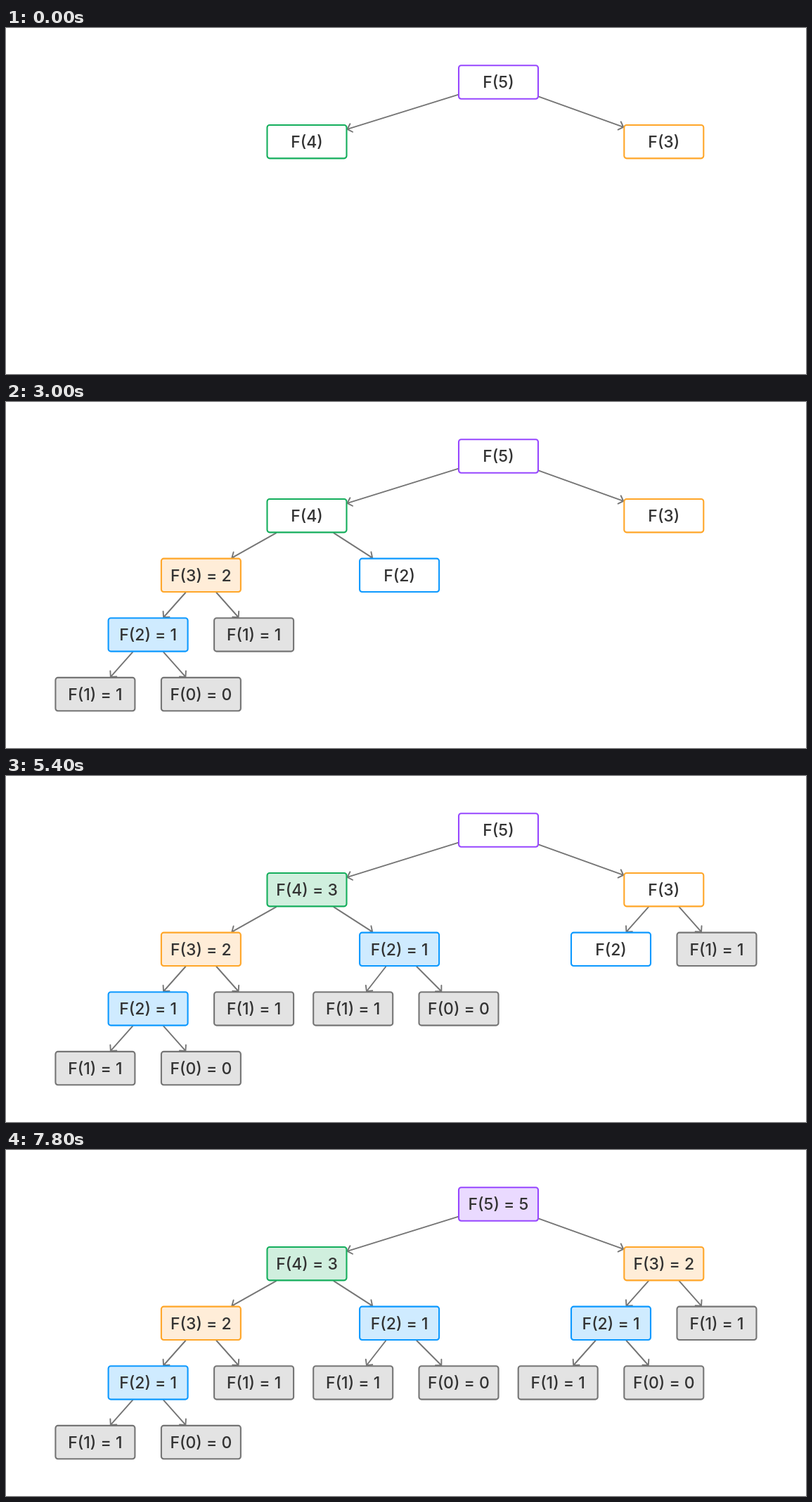
Animation of 1138 by 492 pixels, one loop 8400 ms. Source, as an HTML page with a canvas:

```html
<!DOCTYPE html>
<html lang="en">
<head>
<meta charset="utf-8">
<title>Recursion tree</title>
<style>
  html, body { margin: 0; width: 100%; height: 100%; overflow: hidden; background: #fff; }
  canvas { display: block; width: 1138px; height: 492px; }
</style>
</head>
<body>
<canvas id="stage" width="1138" height="492"></canvas>
<script>
const ctx = document.getElementById('stage').getContext('2d');
const STEP = 600, STEPS = 14;
const BOX_W = 113, BOX_H = 47.4;
const TOP = 77, ROW = 84.65;
const GREY = '#757575';

// Stroke and solved fill, indexed by n.
const COLORS = [
  [GREY, '#e3e3e3'],
  [GREY, '#e3e3e3'],
  ['#0d99ff', '#cfebff'],
  ['#ffa629', '#ffedd8'],
  ['#14ae5c', '#d0efde'],
  ['#9747ff', '#eadaff']
];
const VALUES = [0, 1, 1, 2, 3, 5];

// Leaves are solved as soon as they are shown; kids appear at step `open`.
const leaf = (n, x) => ({ n, x, solved: 0, open: 0, kids: [] });
const call = (n, x, open, solved, ...kids) => ({ n, x, open, solved, kids });

const root = call(5, 700.5, 0, 13,
  call(4, 428, 1, 8,
    call(3, 277.4, 2, 5,
      call(2, 202.1, 3, 4, leaf(1, 126.9), leaf(0, 277.4)),
      leaf(1, 352.6)),
    call(2, 559.6, 6, 7, leaf(1, 493.7), leaf(0, 644))),
  call(3, 935.8, 9, 12,
    call(2, 860.5, 10, 11, leaf(1, 785.2), leaf(0, 935.8)),
    leaf(1, 1011)));

function drawArrow(x1, y1, x2, y2) {
  const dx = x2 - x1, dy = y2 - y1;
  // Share of the line hidden behind each box.
  const cut = Math.min((BOX_W / 2 + 1) / Math.abs(dx), (BOX_H / 2 + 1) / dy);
  const tipX = x2 - dx * cut, tipY = y2 - dy * cut;
  const back = Math.atan2(-dy, -dx);
  ctx.strokeStyle = GREY;
  ctx.lineWidth = 1.9;
  ctx.beginPath();
  ctx.moveTo(x1 + dx * cut, y1 + dy * cut);
  ctx.lineTo(tipX, tipY);
  for (const turn of [-Math.PI / 4, Math.PI / 4]) {
    ctx.moveTo(tipX, tipY);
    ctx.lineTo(tipX + 8.5 * Math.cos(back + turn), tipY + 8.5 * Math.sin(back + turn));
  }
  ctx.stroke();
}

function drawBox({ n, x, solved }, y, step) {
  const done = step >= solved;
  const [stroke, fill] = COLORS[n];
  ctx.beginPath();
  ctx.roundRect(x - BOX_W / 2, y - BOX_H / 2, BOX_W, BOX_H, 3.5);
  ctx.fillStyle = done ? fill : '#fff';
  ctx.fill();
  ctx.strokeStyle = stroke;
  ctx.lineWidth = 2.1;
  ctx.stroke();
  ctx.fillStyle = '#333';
  ctx.fillText(`F(${n})` + (done ? ` = ${VALUES[n]}` : ''), x, y + 8.4);
}

function drawNode(node, y, step) {
  if (step >= node.open) {
    for (const kid of node.kids) {
      drawArrow(node.x, y, kid.x, y + ROW);
      drawNode(kid, y + ROW, step);
    }
  }
  drawBox(node, y, step);
}

function frame() {
  const step = Math.floor(performance.now() / STEP) % STEPS;
  ctx.fillStyle = '#fff';
  ctx.fillRect(0, 0, 1138, 492);
  ctx.font = '500 23px Inter, sans-serif';
  ctx.textAlign = 'center';
  ctx.lineCap = ctx.lineJoin = 'round';
  drawNode(root, TOP, step);
  requestAnimationFrame(frame);
}
frame();
</script>
</body>
</html>
```
